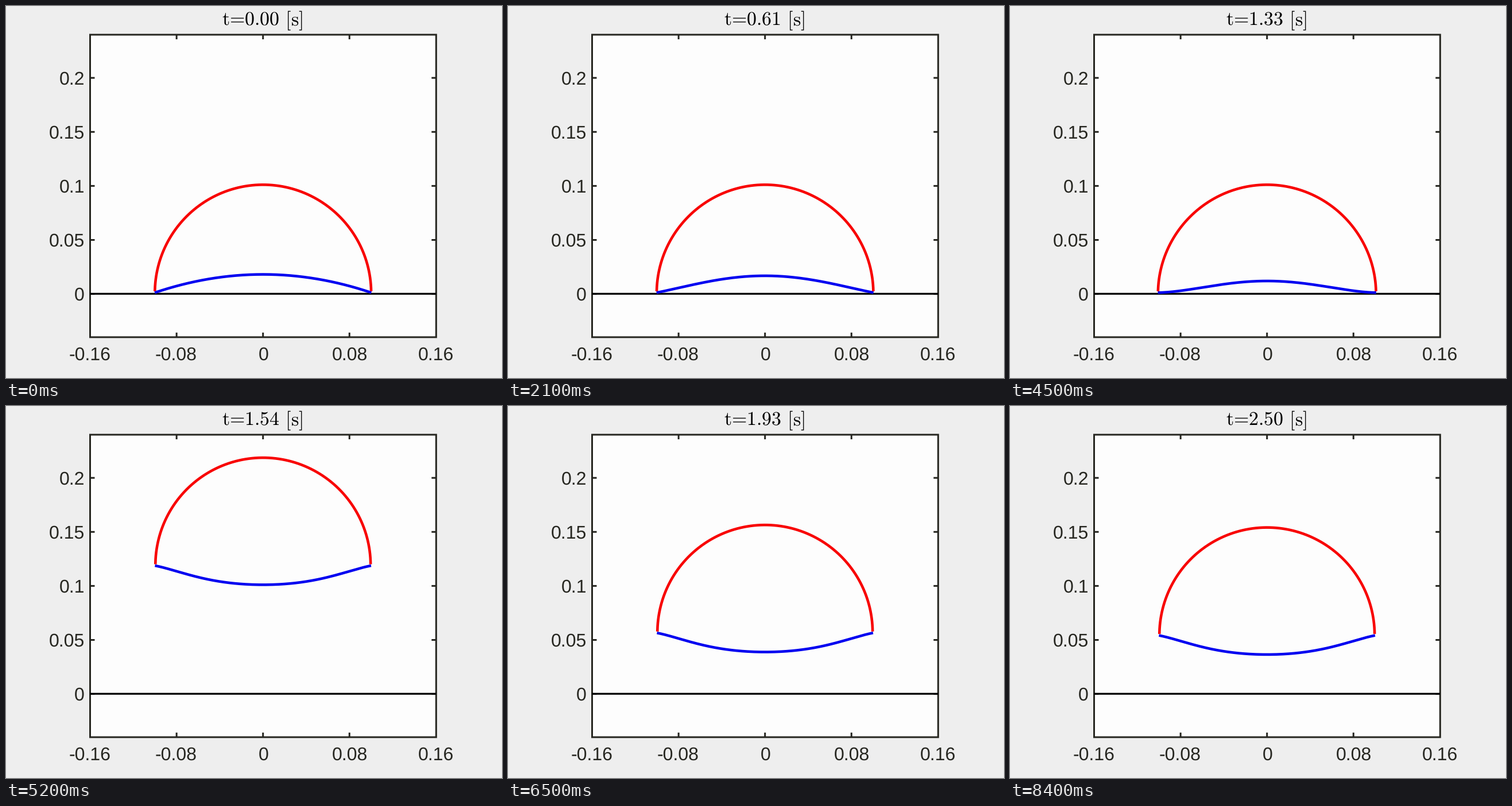
Animation, 864 px wide and 648 px high, one loop 8.5 s. Source, as a matplotlib script:

```python
import numpy as np
import matplotlib.pyplot as plt
from matplotlib.animation import FuncAnimation
from matplotlib.patches import Rectangle

W, H, DPI = 864, 648, 100
FRAMES, INTERVAL = 85, 100
PT = 72 / DPI  # points per pixel

# Pixel position of the plot origin and pixels per metre
CX, CY, SCALE = 447.7, 501.6, 1882.0
LEFT, RIGHT, TOP, BOTTOM = 146.5, 749.3, 50.0, 576.9
INK = "#262620"

G = 9.81
RADIUS = 0.0999
REST = 0.0012        # rim height while standing on the ground
SAG = 0.0177         # depth of the membrane once it has snapped down
SNAP = 1.36          # creep ends, the membrane snaps
FLIGHTS = [(1.375, 1.4158), (1.6785, 1.384), (1.9749, 1.3541), (2.2649, 1.3041)]
CONTACT = 0.014      # time spent on the ground at each bounce

plt.rcParams["mathtext.fontset"] = "cm"
plt.rcParams["text.hinting"] = "none"


def clock(i):
    return max(0.0, 0.03 * i - 0.02)


def shell_state(t):
    """Rim height, membrane height, its edge flattening and power, foot spread."""
    if t < FLIGHTS[0][0]:
        left = max(0.0, 1 - t / SNAP)
        drop = 0.01142 * (1 - left ** 0.2)
        part = drop / 0.0061
        flat = min(1.0, 0.9 * part ** 0.6)
        return REST, 0.0169 - drop, flat, 2, 0.002 + 0.008 * min(part, 1)

    start, speed = [f for f in FLIGHTS if f[0] <= t][-1]
    tau = t - start
    airtime = 2 * speed / G
    if tau <= airtime:
        height, squeeze = speed * tau - G * tau ** 2 / 2, 0.0
    else:
        height = 0.0
        phase = min(1.0, (tau - airtime) / CONTACT)
        squeeze = speed * CONTACT / np.pi * np.sin(np.pi * phase)
    sag = SAG - squeeze
    return 0.001 + height + sag, -sag, 0.45, 4, -0.003


def to_px(x, y):
    return CX + SCALE * x, CY - SCALE * y


def title_text(t):
    return r"$\mathrm{t\hspace{-0.2}=\hspace{-0.2}%.2f\hspace{0.37}[s]}$" % t


fig = plt.figure(figsize=(W / DPI, H / DPI), dpi=DPI, facecolor="#eeeeee")
ax = fig.add_axes([0, 0, 1, 1])
ax.set_xlim(0, W)
ax.set_ylim(H, 0)
ax.axis("off")


def stroke(xs, ys, color, width, z):
    return ax.plot(xs, ys, color=color, lw=width * PT, zorder=z, snap=False,
                   solid_capstyle="butt", solid_joinstyle="round")[0]


def label(x, y, text, align):
    ax.text(x, y, text, ha=align, va="baseline", color=INK,
            family="Liberation Sans", fontsize=32 * PT)


def box(fill, edge, z):
    ax.add_patch(Rectangle((LEFT, TOP), RIGHT - LEFT, BOTTOM - TOP,
                           fc=fill, ec=edge, lw=3 * PT, zorder=z,
                           joinstyle="miter", snap=False))


box("#fdfdfd", "none", 0)
box("none", INK, 3)

for value in (-0.16, -0.08, 0, 0.08, 0.16):
    x = to_px(value, 0)[0]
    label(x + (-0.6 if value < 0 else 0.5), 617, f"{value:g}", "center")
    if abs(value) < 0.16:
        stroke([x, x], [BOTTOM, BOTTOM - 8], INK, 3, 3)
        stroke([x, x], [TOP, TOP + 8], INK, 3, 3)

for value in (0, 0.05, 0.1, 0.15, 0.2):
    y = to_px(0, value)[1]
    label(136.8, y + 11.5, f"{value:g}", "right")
    stroke([LEFT, LEFT + 8], [y, y], INK, 3, 3)
    stroke([RIGHT, RIGHT - 8], [y, y], INK, 3, 3)

stroke([LEFT, RIGHT], [CY - 0.3, CY - 0.3], "black", 3.2, 4)
dome = stroke([], [], "#f80000", 4.6, 5)
membrane = stroke([], [], "#0000f0", 4.6, 6)
title = ax.text(446.2, 34, "", ha="center", va="baseline", color="black",
                fontsize=33.9 * PT)

theta = np.linspace(0.013, np.pi - 0.013, 200)
s = np.linspace(-1, 1, 161)


def update(i):
    t = clock(i)
    rim, height, flat, power, spread = shell_state(t)

    flare = 1 + spread * (1 - np.sin(theta))
    dome.set_data(*to_px(RADIUS * np.cos(theta) * flare,
                         rim + RADIUS * np.sin(theta)))

    profile = (1 - s ** 2) * (1 - flat * s ** power)
    membrane.set_data(*to_px(0.1 * (1 + max(spread, 0)) * s,
                             rim + height * profile))

    title.set_text(title_text(t))
    return dome, membrane, title


anim = FuncAnimation(fig, update, frames=FRAMES, interval=INTERVAL,
                     init_func=lambda: update(0), repeat=True, repeat_delay=0)
plt.show()
```
